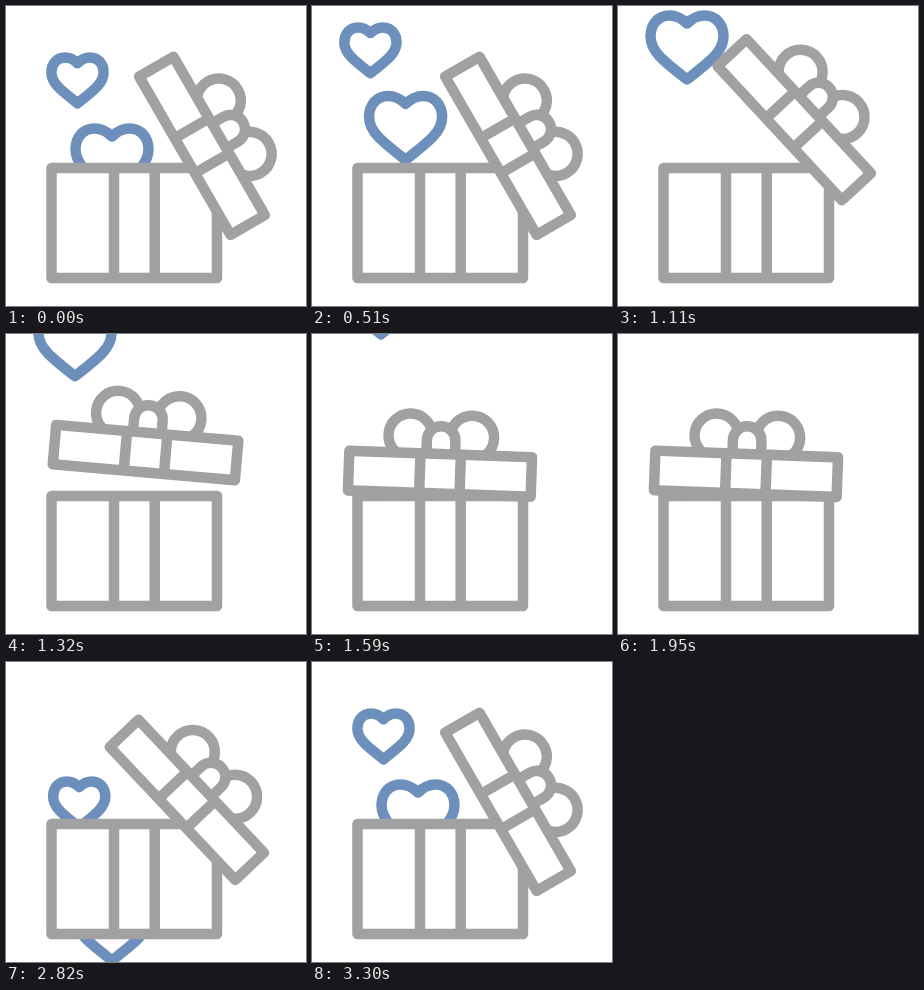
An HTML page that plays this animation: 300x300 px, repeating every 3.6 s.

```html
<!DOCTYPE html>
<html lang="en">
<head>
<meta charset="utf-8">
<title>Gift box</title>
<style>
  html, body { margin: 0; width: 100%; height: 100%; overflow: hidden; background: #fff; }
  svg { display: block; width: 100vw; height: 100vh; }
  path, rect, circle { stroke-width: 10.5; stroke-linejoin: round; }
  .gift { fill: #fff; stroke: #a1a1a1; }
  .heart { fill: none; stroke: #6c90bb; }
</style>
</head>
<body>
<svg viewBox="0 0 300 300">
  <path id="small" class="heart"/>
  <path id="large" class="heart"/>
  <g class="gift">
    <rect x="45.5" y="162" width="165.5" height="110"/>
    <path d="M108 162V272M148.7 162V272"/>
  </g>
  <g id="lid" class="gift">
    <circle cx="-30.8" cy="-37.2" r="22"/>
    <circle cx="30.8" cy="-37.2" r="22"/>
    <path d="M-14.3 -19V-33.2A14.3 14.3 0 0 1 14.3 -33.2V-19"/>
    <rect x="-91.4" y="-19.8" width="182.8" height="39.6"/>
    <path d="M-20.2 -19V19M20.2 -19V19"/>
  </g>
</svg>
<script>
const LOOP = 3600, STEP = 30;
const OPEN_ANGLE = 60, OPEN_SHIFT = 68;
const CLOSE_AT = 914, CLOSE_TURN = 424, CLOSE_MOVE = 550;
const RATTLE_AT = 1350, RATTLE_PERIOD = 343, RATTLE_SWINGS = 2.5;
const REOPEN_AT = 2403, REOPEN_TIME = 600;
const FLIGHT_AT = 180, REST_AT = 3300;

const byId = id => document.getElementById(id);
const part = (t, start, length) => Math.min(1, Math.max(0, (t - start) / length));
const ease = u => u * u * (3 - 2 * u);
const move = (node, x, y, angle = 0) =>
  node.setAttribute("transform", `translate(${x} ${y}) rotate(${angle})`);

const hearts = [
  { node: byId("small"), size: 0.715, x: 71.5, y: 51.5, launch: 2460, rise: 73, drift: 39 },
  { node: byId("large"), size: 1, x: 106, y: 122.5, launch: 2820, rise: 79, drift: 37 }
];
for (const { node, size } of hearts) {
  const outline = "M0 8C-6 2 -12 0 -17.5 0C-29 0 -36.5 9 -36.5 21C-36.5 36 -23 46 0 64" +
    "C23 46 36.5 36 36.5 21C36.5 9 29 0 17.5 0C12 0 6 2 0 8Z";
  node.setAttribute("d", outline.replace(/-?[\d.]+/g, v => v * size));
}

function drawLid(t) {
  if (t >= REOPEN_AT) {
    const open = ease(part(t, REOPEN_AT, REOPEN_TIME));
    move(byId("lid"), 128 + OPEN_SHIFT * open, 139.8 - 3 * Math.sin(Math.PI * open), OPEN_ANGLE * open);
    return;
  }
  // The lid tips shut while it hops back over the box, then rattles.
  const turn = part(t, CLOSE_AT, CLOSE_TURN), shut = part(t, CLOSE_AT, CLOSE_MOVE);
  const swings = RATTLE_SWINGS * part(t, RATTLE_AT, RATTLE_SWINGS * RATTLE_PERIOD);
  const angle = OPEN_ANGLE * (1 - turn * turn) - 2.1 * Math.sin(2 * Math.PI * swings);
  move(byId("lid"), 128 + OPEN_SHIFT * (1 - ease(shut)), 139.8 - 29 * Math.sin(Math.PI * shut), angle);
}

function drawHeart(h, t) {
  if (t >= h.launch) {
    const u = part(t, h.launch, REST_AT - h.launch);
    move(h.node, h.x + 4 * Math.sin(2 * Math.PI * u), h.y + 112 * (1 - ease(u)));
  } else {
    const time = Math.max(0, t - FLIGHT_AT);
    move(h.node, h.x - h.drift * ease(part(time, 0, 850)), h.y - h.rise * (time / 690) ** 1.2);
  }
}

function draw(t) {
  drawLid(t);
  hearts.forEach(h => drawHeart(h, t));
}

const begin = performance.now();
function tick() {
  const t = (performance.now() - begin) % LOOP;
  draw(Math.floor(t / STEP) * STEP);
  requestAnimationFrame(tick);
}
tick();
</script>
</body>
</html>
```
